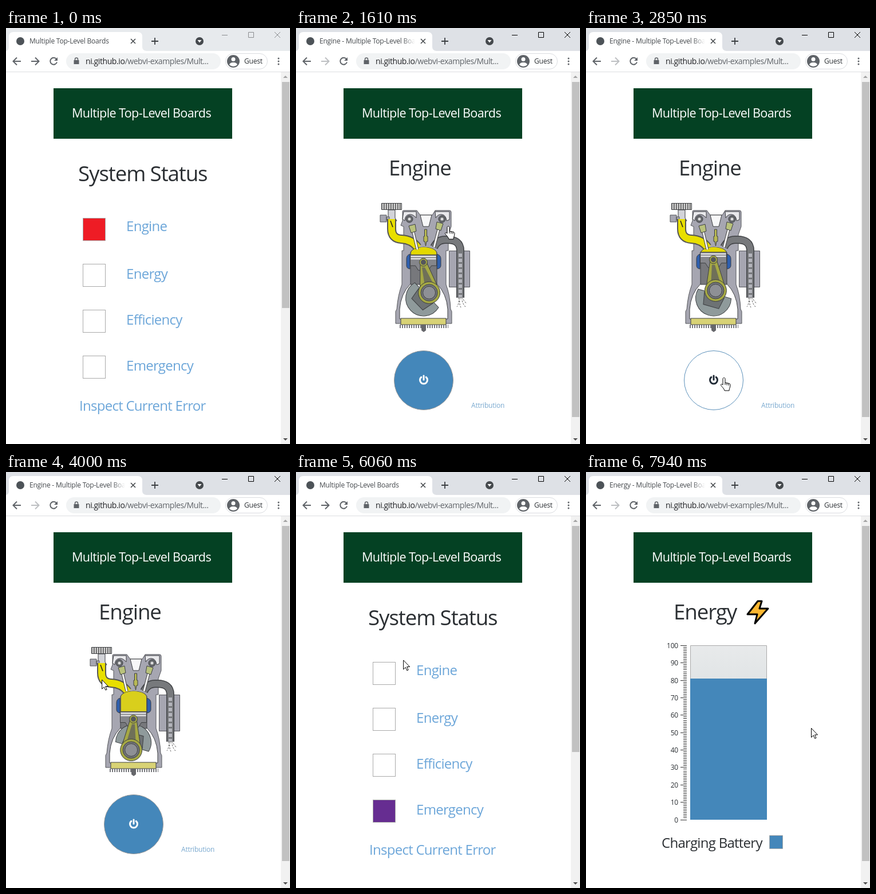
An HTML page for the animation above (8000 ms loop, 496x725 px).

```html
<!DOCTYPE html>
<html lang="en">
<head>
<meta charset="utf-8">
<title>Multiple Top-Level Boards</title>
<style>
html, body { margin: 0; width: 100%; height: 100%; overflow: hidden; background: #fff; }
svg { display: block; width: 496px; height: 725px; }
text { font-family: "Open Sans", "Noto Sans", sans-serif; letter-spacing: -.03em; fill: #2b2f33; white-space: pre; }
.title { font-size: 36.7px; }
.big { font-size: 24px; }
.small { font-size: 12px; letter-spacing: -.018em; }
.link { fill: #6ca6d9; }
.line { fill: none; stroke: #5f6368; stroke-width: 2; }
.edge { stroke: #3d3f42; stroke-width: 1; }
.metal { fill: #a6a6b1; stroke: #55565b; stroke-width: 1; }
.stem { fill: none; stroke: #444; stroke-width: 5; }
.stem + .stem { stroke: #f3f3f3; stroke-width: 3; }
.cursor { fill: #fff; stroke: #000; stroke-width: 1; stroke-linejoin: round; }
</style>
</head>
<body>
<svg viewBox="0 0 496 725" xmlns="http://www.w3.org/2000/svg">
  <defs>
    <linearGradient id="fade"><stop offset="0" stop-color="#fff" stop-opacity="0"/><stop offset="1" stop-color="#fff"/></linearGradient>
    <linearGradient id="glass" x2="0" y2="1"><stop offset="0" stop-color="#e8eaeb"/><stop offset=".45" stop-color="#d7dddf"/><stop offset="1" stop-color="#d5dbdd"/></linearGradient>
    <clipPath id="tabClip"><path d="M38 10H208V36H38Z"/></clipPath>
    <pattern id="soot" width="9" height="8" patternUnits="userSpaceOnUse">
      <path fill="#4b4d51" d="M0 0H9V8H0Z"/>
      <path fill="#8b8d90" d="M1 1h1v1h-1zM5 2h1v1h-1zM3 5h1v1h-1zM7 6h1v1h-1z"/>
    </pattern>
    <pattern id="grille" width="4" height="12" patternUnits="userSpaceOnUse" x="149">
      <path fill="#d5d5d5" d="M0 0H4V12H0Z"/><path fill="#555" d="M0 0H1.6V12H0Z"/>
    </pattern>
  </defs>
  <path fill="#fff" d="M0 0H496V725H0Z"/>

  <g id="status">
    <text class="title" x="126" y="267">System Status</text>
    <g id="leds" stroke="#aaa"></g>
    <g id="links"></g>
    <text class="big link" x="128" y="667">Inspect Current Error</text>
  </g>

  <g id="engine">
    <text class="title" x="162" y="257">Engine</text>
    <path fill="url(#grille)" class="edge" d="M149.500 305.500H184.500V316.500H149.500Z"/>
    <path fill="#d2d3d8" class="edge" d="M161 317H173V331L176 336H161Z"/>
    <path class="metal" d="M147 326H158V338H147ZM158 329H163V335H158Z"/>
    <path class="metal" d="M186 336V320Q186 318 188 318H211L217 326H238L243 318H268Q271 318 271 321V346L266 360V388H262V447Q269 465 270 490L272 494V515H174V494L176 490Q178 465 185 447V388H188V346L183 344Z"/>
    <path fill="#e9e9ec" class="edge" d="M188 320H210V331Q204 324 198 325 190 326 190 336L186 333ZM243 320H268V334L263 336Q262 326 255 325 248 324 244 331Z"/>
    <path fill="#f7f7f8" class="edge" d="M217 326H237L232 346H222Z"/>
    <path fill="#fff" class="edge" d="M200 446H246Q263 463 265 490V507H181V490Q183 463 200 446Z"/>
    <path fill="#d8d275" class="edge" d="M183 506H262V517H183Z"/>
    <path fill="none" stroke="#77787d" stroke-width="6" stroke-dasharray="2 2" d="M181 520H266"/>
    <path fill="#66676b" d="M219 517H227V527L223 530 219 527Z"/>
    <path fill="#2e5fae" class="edge" d="M199 394Q193 396 193 402V414Q193 419 199 420ZM246 394Q253 396 253 402V414Q253 419 246 420Z"/>
    <g fill="none">
      <path stroke="#555" stroke-width="16" d="M167 333V350Q167 367 184 368 203 369 212 382"/>
      <path stroke="#e8df00" stroke-width="12" d="M167 333V350Q167 367 184 368 203 369 213 383"/>
      <path stroke="#222" stroke-width="1.500" d="M165 336L169 347"/>
      <path class="metal" d="M267.500 388.500H303.500V451.500H267.500Z"/>
      <path stroke="#3f4144" stroke-width="14" d="M241 382Q248 368 262 369 287 368 287 388V470"/>
      <path stroke="#77797c" stroke-width="11" d="M241 382Q248 368 262 369 287 368 287 388V470"/>
      <path stroke="#b5b6bd" stroke-width="6" stroke-dasharray="6 3" d="M287 393V469"/>
      <path stroke="#555" stroke-dasharray="3 2" d="M284 470Q286 478 281 486M287 470Q284 480 288 487M290 470Q289 478 296 486M292 473L298 481"/>
    </g>
    <path fill="#77787c" class="edge" d="M200 391Q203 383 223 382 243 383 246 391V447H200Z"/>
    <path id="gas"/>
    <path fill="#b8b955" class="edge" d="M224.500 351H228.500V363H230V372H228L226.500 380 225 372H223V363H224.500Z"/>
    <g id="intakeValve"><path class="stem" d="M201 340L211 382"/><path class="stem" d="M201 340L211 382"/><path fill="#b9c27c" class="edge" d="M196 341L207 338 209 350 200 353Z"/></g>
    <g id="exhaustValve"><path class="stem" d="M252 340L241 382"/><path class="stem" d="M252 340L241 382"/><path fill="#b9c27c" class="edge" d="M246 338L257 341 253 353 244 350Z"/></g>
    <g fill="#66696c" class="edge"><circle cx="198" cy="333" r="6"/><circle cx="255" cy="333" r="6"/></g>
    <g fill="#ddd"><circle cx="198" cy="333" r="2.500"/><circle cx="255" cy="333" r="2.500"/></g>
    <g id="weight">
      <path fill="#8f9a9b" class="edge" d="M-30 -8H30A31 31 0 1 1 -30 -8Z"/>
      <path fill="#6d7274" class="edge" d="M-18 -6H18L14 15H-14Z"/>
    </g>
    <g id="piston">
      <path fill="#85868b" class="edge" d="M-23 -13H23V6H14L9 14H-9L-14 6H-23Z"/>
      <path stroke="#f0f0f0" stroke-width="2" d="M-22 -10H22M-22 -6H22"/>
    </g>
    <path id="rod" fill="#a5a844" class="edge"/>
    <path id="web" fill="#6f7058"/>
    <g id="bigEnd"><circle r="19" fill="#a5a844" class="edge"/><circle r="14.500" fill="#737579" class="edge"/><circle r="11" fill="#8e9095" class="edge"/></g>
    <g id="smallEnd"><circle r="7" fill="#a5a844" class="edge"/><circle r="4.500" fill="#55575b"/></g>
    <circle id="button" cx="223" cy="614" r="51.500"/>
    <path id="power" fill="none" stroke-width="3" stroke-linecap="round" d="M223 606V613M218.800 608.500A6.500 6.500 0 1 0 227.200 608.500"/>
    <text class="small" x="306" y="662" style="fill:#7baad0">Attribution</text>
  </g>

  <g id="energy">
    <text class="title" x="153" y="257">Energy</text>
    <path fill="#fdb731" stroke="#000" stroke-width="3" stroke-linejoin="round" d="M300 225H307L303 238H318L295 264 299 248H282Z"/>
    <g id="axis"></g>
    <path fill="url(#glass)" stroke="#aaa" d="M182.500 302.500H315.500V605.500H182.500Z"/>
    <rect id="level" x="182" width="134" fill="#4487ba"/>
    <text class="big" x="132" y="655">Charging Battery</text>
    <path fill="#4487ba" stroke="#aaa" d="M320.500 633.500H343.500V656.500H320.500Z"/>
  </g>

  <path fill="#044123" d="M83 105H395V193H83Z"/>
  <text x="115" y="156" font-size="21.600" style="fill:#fff">Multiple Top-Level Boards</text>

  <path fill="#f1f1f1" d="M480 77H496V725H480Z"/>
  <rect id="thumb" x="482" y="94" width="13" fill="#c1c1c1"/>
  <path fill="#a3a3a3" d="M484 87L488 83 492 87Z"/>
  <path fill="#505050" d="M484 715H492L488 719Z"/>

  <path id="strip" d="M0 0H496V40H0Z"/>
  <path fill="#fff" d="M0 40Q5 39 5 33V15Q5 7 13 7H230Q238 7 238 15V33Q238 39 245 40H496V76H0Z"/>
  <path fill="#dcdde0" d="M0 76H496V77H0Z"/>
  <circle cx="25" cy="23" r="7" fill="#4d5358"/>
  <g clip-path="url(#tabClip)"><text id="tab" class="small" x="41" y="27" style="fill:#45494d"></text></g>
  <path fill="url(#fade)" d="M186 12H208V34H186Z"/>
  <path class="line" style="stroke:#45494d;stroke-width:1.600" d="M218 19L226 27M226 19L218 27"/>
  <path class="line" style="stroke:#3c4043;stroke-width:1.800" d="M260 17V29M254 23H266"/>
  <circle cx="338" cy="23" r="7" fill="#45494d"/><path fill="#fff" d="M334.500 21H341.500L338 25.500Z"/>
  <path id="controls" fill="none" d="M377 12.500H387M423.500 7.500H432.500V16.500H423.500ZM469 7L479 17M479 7L469 17"/>
  <circle id="backHover" cx="19" cy="58" r="14" fill="#f0f1f2"/>
  <path class="line" d="M26 58H13M19 51.500L12.500 58 19 64.500"/>
  <path id="forward" class="line" d="M44 58H57M51 51.500L57.500 58 51 64.500"/>
  <path class="line" d="M88 54A6 6 0 1 0 89 59.500"/><path fill="#5f6368" d="M90 51V57H84Z"/>
  <rect x="105" y="44" width="270" height="28" rx="14" fill="#f1f3f4"/>
  <path fill="#5f6368" d="M118.500 56H127.500V63H118.500Z"/><path class="line" style="stroke-width:1.500" d="M120.500 56V54.500Q120.500 52 123 52T125.500 54.500V56"/>
  <text x="139" y="63" font-size="14" style="fill:#5f6368"><tspan fill="#202124">ni.github.io</tspan>/webvi-examples/Mult...</text>
  <rect x="383.500" y="44.500" width="73" height="27" rx="13.500" fill="#fff" stroke="#dadce0"/>
  <circle cx="397" cy="58" r="11" fill="#5f6368"/><circle cx="397" cy="54.500" r="3.500" fill="#fff"/><path fill="#fff" d="M390 64Q391 60 397 60T404 64Q401 67 397 67T390 64Z"/>
  <text class="small" x="416" y="62">Guest</text>
  <g fill="#5f6368"><circle cx="476" cy="53" r="1.500"/><circle cx="476" cy="58" r="1.500"/><circle cx="476" cy="63" r="1.500"/></g>

  <g id="bubble"><path fill="#dee1e6" stroke="#c8cbd0" d="M-1 704.500H157Q161.500 704.500 161.500 709V726H-1Z"/><text class="small" x="5" y="719" style="fill:#5f6368">https://ni.github.io/webvi...</text></g>
  <path id="arrow" class="cursor" d="M.5.5V16.500L4.200 13 6.700 18.500 9 17.500 6.600 12H11.500Z"/>
  <path id="hand" class="cursor" d="M0 .5C1 .5 2 1.300 2 2.500V9L9 10.500C10.500 11 11 12 11 13 11 18 9 19 9 23H1C0 19 -4 16 -5.500 13.500 -6 11.500 -4 11 -2 13V2.500C-2 1.300 -1 .5 0 .5ZM2 9V13M5 10V13.500M8 10.500V14"/>
</svg>
<script>
const LOOP = 8000, BLUE = '#4487ba';
const el = id => document.getElementById(id);
const set = (id, attrs) => { for (const k in attrs) el(id).setAttribute(k, attrs[k]); };
const show = (id, on) => set(id, { visibility: on ? 'visible' : 'hidden' });
const move = (id, x, y, angle = 0) => set(id, { transform: `translate(${x} ${y}) rotate(${angle})` });
const within = (t, a, b) => t >= a && t < b;

['Engine', 'Energy', 'Efficiency', 'Emergency'].forEach((name, i) => {
  el('leds').innerHTML += `<rect id="led${i}" x="134.5" y="${331.5 + 80 * i}" width="39" height="39" fill="#fff"/>`;
  el('links').innerHTML += `<text id="link${i}" class="big link" x="210" y="${i ? 357 + 80 * i : 354}">${name}</text>`;
});

let ticks = '', labels = '';
for (let v = 0; v <= 100; v++) {
  const y = Math.round(605.5 - v * 3.035) + .5;
  ticks += `M${v % 10 ? 170 : 165} ${y}H176`;
  if (v % 10 === 0) labels += `<text class="small" x="161" y="${y + 4.5}" text-anchor="end">${v}</text>`;
}
el('axis').innerHTML = `<path d="${ticks}" stroke="#333"/>${labels}`;

// start, page, time its content appears
const pages = [[0, 'status', 0], [1080, 'engine', 1290], [5120, 'status', 5260], [6720, 'energy', 6860]];
const titles = { status: '', engine: 'Engine - ', energy: 'Energy - ' };

// time, x, y
const path = [
  [70, 436, 706], [340, 266, 345], [1950, 266, 345], [2250, 262, 470], [2450, 241, 609],
  [3650, 241, 609], [3950, 185, 400], [4290, 66, 144], [4520, 14, 50], [4600, 12, 32],
  [4750, 16, 58], [4910, 22, 71], [5250, 22, 71], [5820, 150, 262], [6060, 187, 327],
  [6300, 217, 441], [7500, 217, 441], [7800, 393, 446]
];

function pointer(t) {
  const i = path.findIndex(p => p[0] > t);
  if (i <= 0) return (i ? path[path.length - 1] : path[0]).slice(1);
  const [a, b] = [path[i - 1], path[i]], k = (t - a[0]) / (b[0] - a[0]);
  return [a[1] + (b[1] - a[1]) * k, a[2] + (b[2] - a[2]) * k];
}

function drawEngine(t) {
  const on = !within(t, 2850, 3380);
  const start = t < 2850 ? 1520 : 3375;
  const steps = on ? Math.max(0, Math.floor((Math.min(t, 4912) - start) / 90)) : 0;
  const phase = (16 + 30 * steps) % 720, a = phase * Math.PI / 180;
  const x = 222.5 + 14 * Math.sin(a), y = 471 - 14 * Math.cos(a);
  const wrist = y - Math.sqrt(54 ** 2 - (x - 222.5) ** 2), stroke = Math.floor(phase / 180);
  move('weight', 222.5, 471, phase);
  move('piston', 222.5, wrist);
  move('smallEnd', 222.5, wrist);
  move('bigEnd', x, y);
  set('rod', { d: `M217 ${wrist}H228L${x + 16} ${y - 8}H${x - 16}Z` });
  set('web', { d: `M220 ${wrist + 9}H225L${x + 8} ${y - 14}H${x - 8}Z` });
  set('gas', {
    d: `M201 391Q204 383 223 382 242 383 245 391V${wrist - 13}H201Z`,
    fill: ['#e3d800', '#d9cf1c', 'url(#soot)', '#6b6d70'][stroke]
  });
  move('intakeValve', stroke === 0 ? 1 : 0, stroke === 0 ? 4 : 0);
  move('exhaustValve', stroke === 3 ? -1 : 0, stroke === 3 ? 4 : 0);
  set('button', { fill: on ? BLUE : '#fff', stroke: on ? '#999' : '#5b90ba' });
  set('power', { stroke: on ? '#fff' : '#212b36' });
}

function draw(t) {
  const [, page, ready] = pages.filter(p => t >= p[0]).pop();
  for (const name in titles) el(name).style.display = name === page && t >= ready ? '' : 'none';
  el('tab').textContent = titles[page] + 'Multiple Top-Level Boards';
  set('thumb', { height: page === 'status' ? 394 : 584 });
  el('forward').style.stroke = page === 'status' ? '#5f6368' : '#bdbfc2';

  const active = t >= 940;
  set('strip', { fill: active ? '#dee1e6' : '#e7eaed' });
  set('controls', { stroke: active ? '#000' : '#8a8c8f' });
  show('backHover', within(t, 4500, 5300));

  set('led0', { fill: t < 1080 ? '#ee1c25' : '#fff' });
  set('led3', { fill: t > 5000 ? '#662d91' : '#fff' });
  set('link0', { 'text-decoration': within(t, 340, 1080) ? 'underline' : 'none' });
  set('link1', { 'text-decoration': within(t, 6280, 6720) ? 'underline' : 'none' });
  const bubble = within(t, 540, 1150) ? (t < 610 ? .5 : 1) : within(t, 6480, 6790) ? (t < 6550 ? .5 : 1) : 0;
  set('bubble', { opacity: bubble });

  if (page === 'engine') drawEngine(t);
  if (page === 'energy') {
    const tick = 7240 + Math.floor((t - 7240) / 70) * 70;
    const height = Math.max(0, 67 + (tick - 7240) * 179 / 700);
    set('level', { y: 606 - height, height });
  }

  const [x, y] = pointer(t);
  const hand = within(t, 300, 2000) || within(t, 2390, 3720) || within(t, 6280, 7520);
  show('hand', hand);
  show('arrow', !hand && t >= 70);
  move('hand', x, y);
  move('arrow', x, y);
}

const origin = performance.now();
function frame() {
  draw((performance.now() - origin) % LOOP);
  requestAnimationFrame(frame);
}
frame();
</script>
</body>
</html>
```
